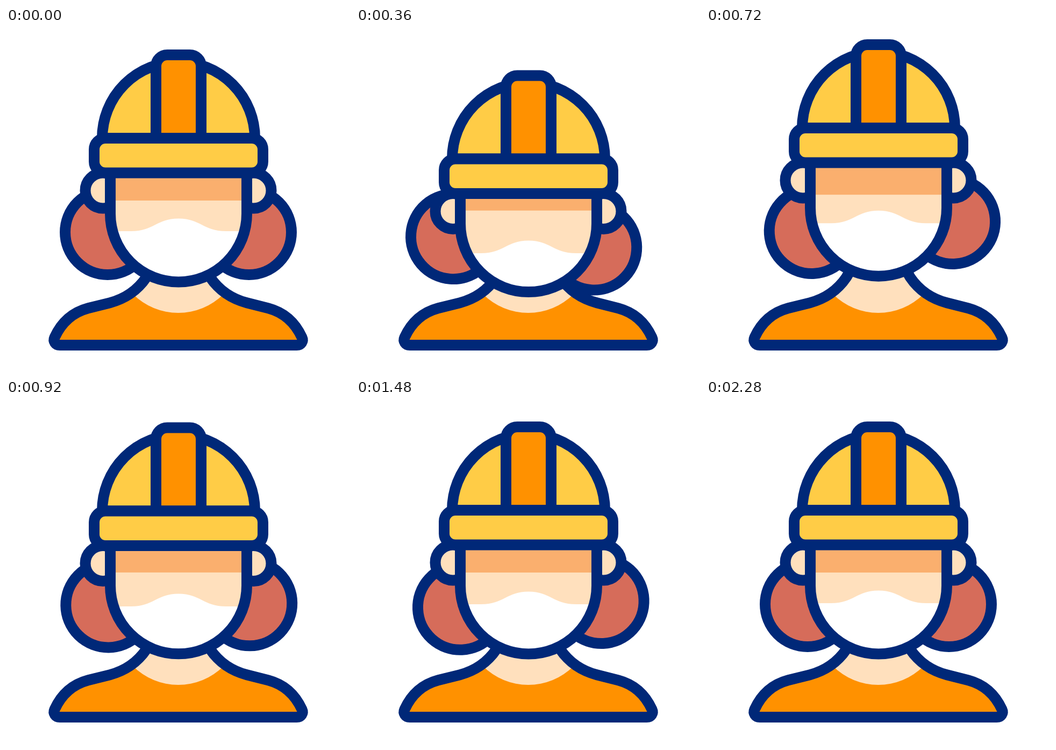
An HTML page with a canvas for the animation above (2.56 s loop, 640 px wide and 640 px high).

```html
<!DOCTYPE html>
<html lang="en">
<head>
<meta charset="utf-8">
<title>Worker</title>
<style>
  html, body { margin: 0; width: 100%; height: 100%; overflow: hidden; background: #fff; }
  canvas { display: block; width: 100vmin; height: 100vmin; }
</style>
</head>
<body>
<canvas id="stage" width="640" height="640"></canvas>
<script>
const ctx = document.getElementById('stage').getContext('2d');
const LOOP = 2560, STEP = 40, CX = 320.5, PIVOT_Y = 272;
const NAVY = '#002878', YELLOW = '#ffcc46', ORANGE = '#ff9100', SKIN = '#ffe0bd',
      SHADE = '#faaf6e', HAIR = '#d66c5a', WHITE = '#fff';

const ease = p => (1 - Math.cos(Math.PI * p)) / 2;

// Eases between [time, value] poses and holds the first and last one.
const tween = (...poses) => t => {
  const next = poses.findIndex(([time]) => time > t);
  if (next < 1) return poses.at(next)[1];
  const [t0, v0] = poses[next - 1], [t1, v1] = poses[next];
  return v0 + (v1 - v0) * ease((t - t0) / (t1 - t0));
};

const nod = tween([0, 0], [283, 20.5], [780, -12], [930, 0], [1040, 0], [1165, 15.5], [1296, 0]);
const hatLag = tween([200, 0], [560, 2.9], [1400, 0]);
const maskLag = tween([180, 0], [500, 4.4], [1240, 4.4], [1700, 0]);
const sway = tween([0, 0], [380, .078], [690, -.07], [1100, .028], [1500, -.045], [1850, .0165], [2260, 0]);

const circle = (x, y, r) => {
  const p = new Path2D();
  p.arc(x, y, r, 0, Math.PI * 2);
  return p;
};

const body = new Path2D(`M100 590H541C549 590 554 583 550.5 575.5
  C537 546 515 528.5 488 521.3L448 511.3C419 503.5 397 489 380 464L366 440
  H275L261 464C244 489 222 503.5 193 511.3L153 521.3C126 528.5 104 546 90.5 575.5
  C87 583 92 590 100 590Z`);
const neck = circle(CX, 411, 119);
const locks = [189, 452].map(x => circle(x, 380, 79));
const ears = [180.5, 460.5].map(x => circle(x, 302.5, 33));
const face = new Path2D('M194 225V345.5A127 127 0 0 0 448 345.5V225Z');
const mask = new Path2D(`M180 378H233C275 378 280 354.5 321 354.5
  C362 354.5 367 378 409 378H460V540H180Z`);
const dome = new Path2D('M179 205A142 142 0 0 1 463 205Z');
const ridge = new Path2D('M279 205V71A21 21 0 0 1 300 50H342A21 21 0 0 1 363 71V205Z');
const brim = new Path2D();
brim.roundRect(164, 205, 314, 64.5, 21);

function fill(path, color) {
  ctx.fillStyle = color;
  ctx.fill(path);
}

function shape(path, color) {
  fill(path, color);
  ctx.stroke(path);
}

function group(dy, paint) {
  ctx.save();
  ctx.translate(0, dy);
  paint();
  ctx.restore();
}

function draw(t) {
  const headY = nod(t), hatY = 2 * headY + hatLag(t), maskY = hatY + maskLag(t);
  ctx.fillStyle = WHITE;
  ctx.fillRect(0, 0, 640, 640);
  ctx.strokeStyle = NAVY;
  ctx.lineWidth = 20;
  ctx.lineJoin = 'round';

  group(headY, () => {
    ctx.translate(CX, PIVOT_Y);
    ctx.rotate(sway(t));
    ctx.translate(-CX, -PIVOT_Y);
    locks.forEach(p => shape(p, HAIR));
  });

  fill(body, ORANGE);
  group(0, () => {
    ctx.clip(body);
    fill(neck, SKIN);
  });
  ctx.stroke(body);

  group(hatY, () => ears.forEach(p => shape(p, SKIN)));

  group(headY, () => {
    fill(face, SKIN);
    group(0, () => {
      ctx.clip(face);
      ctx.fillStyle = SHADE;
      ctx.fillRect(190, 220, 262, 101);
      ctx.translate(0, maskY - headY);
      fill(mask, WHITE);
    });
    ctx.stroke(face);
  });

  group(hatY, () => {
    shape(dome, YELLOW);
    shape(ridge, ORANGE);
    shape(brim, YELLOW);
  });
}

const start = performance.now();
function tick() {
  const t = (performance.now() - start) % LOOP;
  draw(Math.floor(t / STEP) * STEP);
  requestAnimationFrame(tick);
}
tick();
</script>
</body>
</html>
```
